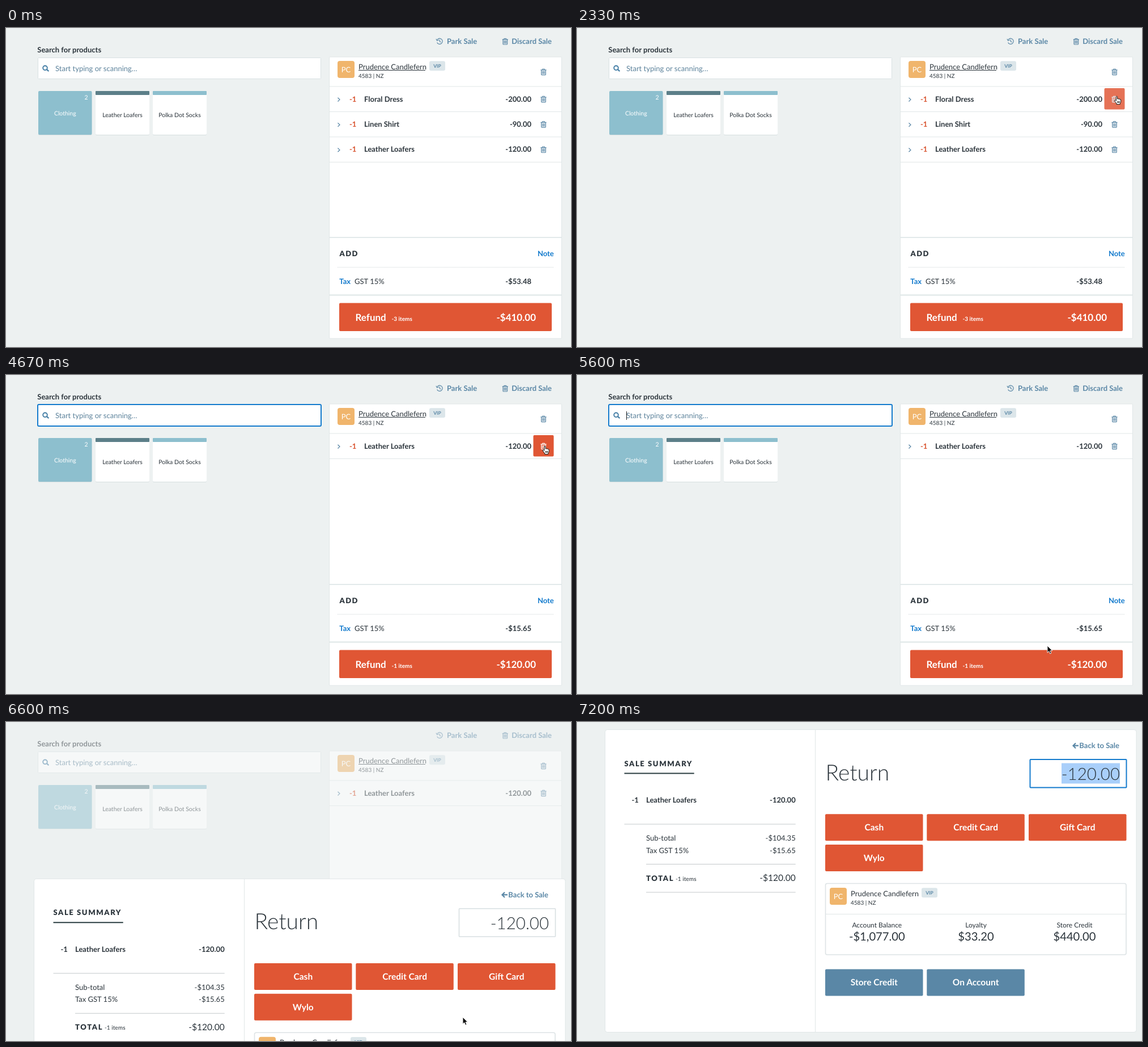
An HTML page for the animation above (8 s loop, 997x562 px).

```html
<!DOCTYPE html>
<html lang="en">
<head>
<meta charset="utf-8">
<title>Return sale</title>
<style>
html, body { margin: 0; width: 100%; height: 100%; overflow: hidden; background: #edf1f1; }
svg { display: block; width: 997px; height: 562px; font-family: Lato, sans-serif; text-rendering: geometricPrecision; }
</style>
</head>
<body>
<svg id="stage" viewBox="0 0 997 562" xmlns="http://www.w3.org/2000/svg"></svg>
<script>
const LOOP = 8000;
const INK = '#2b343b', BLUE = '#5a87a6', LINK = '#147bcd', RED = '#e05634', LINE = '#e0e6e7';
const CUSTOMER = 'Prudence Candlefern', INITIALS = 'PC', TERMINAL = 'Wylo';
const ITEMS = [['Floral Dress', 200], ['Linen Shirt', 90], ['Leather Loafers', 120]];
const CLICKS = [2870, 4130], PAY = 6430, SLIDE = 490, ROW = 44.4;

// markup helpers
const text = (x, y, s, o = {}) =>
  `<text x="${x}" y="${y}" font-size="${o.size || 13}" font-weight="${o.w || 400}" fill="${o.fill || INK}"` +
  ` text-anchor="${o.at || 'start'}"${o.ls ? ` letter-spacing="${o.ls}"` : ''}${o.id ? ` id="${o.id}"` : ''}>${s}</text>`;
const bold = (x, y, s, o = {}) => text(x, y, s, { w: 700, ...o });
const box = (x, y, w, h, fill, r = 0, more = '') =>
  `<rect x="${x}" y="${y}" width="${w}" height="${h}" rx="${r}" fill="${fill}" ${more}/>`;
const rule = (x1, x2, y, color = LINE, w = 1, more = '') =>
  `<path d="M${x1} ${y}H${x2}" stroke="${color}" stroke-width="${w}" ${more}/>`;
const group = (id, body, more = '') => `<g id="${id}" ${more}>${body}</g>`;

const trash = (x, y, color = BLUE) =>
  `<g transform="translate(${x} ${y})" fill="none" stroke="${color}">` +
  `<path d="M-5 -3.5H5" stroke-width="1.4"/><path d="M-2 -4V-5.3H2V-4"/>` +
  `<path d="M-3.8 -3V4.2Q-3.8 5.2 -2.8 5.2H2.8Q3.8 5.2 3.8 4.2V-3" stroke-width="1.2"/>` +
  `<path d="M-1.8 -1.7V3.6M0 -1.7V3.6M1.8 -1.7V3.6" stroke-width="1.1"/></g>`;

const customer = (x, y, line) =>
  box(x, y, 30, 30, '#f0b56c', 4) +
  text(x + 15, y + 19.7, INITIALS, { fill: '#fff', at: 'middle' }) +
  text(x + 37, y + 14.6, CUSTOMER, line ? { id: 'buyer' } : {}) +
  (line ? rule(x + 37, x + 155, y + 16.5, INK) : '') +
  text(x + 37, y + 29.8, '4583 | NZ', { size: 10 }) +
  box(x + 162, y + 0.2, 28, 17, '#dce6ea', 3) +
  bold(x + 176, y + 11.8, 'VIP', { size: 8.5, fill: BLUE, at: 'middle' });

const tile = (x, label, top) =>
  box(x, 112, 95, 77, '#d6dfe0', 2) + box(x, 111, 95, 77, '#fff', 2) +
  box(x, 111, 95, 7, top, 1) +
  text(x + 47.5, 157, label, { size: 10.5, at: 'middle' });

const payButton = (x, y, label, fill) =>
  box(x, y, 172.5, 47, fill, 2) +
  bold(x + 86.3, y + 28.8, label, { size: 15.5, fill: '#fff', at: 'middle' });

const itemRow = ([name, price], i) => group('row' + i,
  `<path d="M585.5 122.7l3.4 3.4l-3.4 3.4" fill="none" stroke="${BLUE}" stroke-width="1.3"/>` +
  bold(606, 129.7, '-1', { fill: '#d9532f' }) + bold(632, 129.7, name) +
  bold(927, 129.7, `-${price}.00`, { at: 'end' }) +
  trash(948.5, 125.5) + rule(571, 980, 147.5));

const balance = (x, label, amount) =>
  text(x, 361.8, label, { size: 12, at: 'middle' }) +
  text(x, 385, amount, { size: 20.2, at: 'middle' });

const register =
  // header links
  `<path d="M760.6 25.5A5 5 0 1 0 761 20.6M759 19.2L760.6 22.3L763.8 21.3M765.3 20.5V23.8L767.5 25" fill="none" stroke="${BLUE}" stroke-width="1.2"/>` +
  bold(778, 28.2, 'Park Sale', { fill: BLUE }) +
  trash(880.8, 23.8) + bold(892.3, 28.2, 'Discard Sale', { fill: BLUE }) +
  // search
  bold(55.3, 43.3, 'Search for products') +
  box(56.5, 52.5, 499, 37, '#fff', 1, `stroke="#d9e1e3"`) +
  box(56, 52, 500, 38, 'none', 2, `id="focus" stroke="${LINK}" stroke-width="2"`) +
  `<path d="M72 73L75.3 76.3" stroke="#417ca4" stroke-width="2.2"/><circle cx="69" cy="70.3" r="3.8" fill="none" stroke="#417ca4" stroke-width="1.9"/>` +
  text(87, 76, 'Start typing or scanning…', { fill: '#5c829b' }) +
  box(87, 64, 1, 15, '#222', 0, 'id="caret"') +
  // tiles
  box(57, 112, 94.5, 77, '#d6dfe0', 2) + box(57, 111, 94.5, 77, '#8dbfce', 2) +
  text(104.3, 153.8, 'Clothing', { size: 10.5, fill: '#fff', at: 'middle' }) +
  text(144.5, 125.5, '2', { size: 10.5, fill: '#fff', at: 'end' }) +
  tile(158, 'Leather Loafers', '#5c7f89') + tile(259, 'Polka Dot Socks', '#8dbfce') +
  // sale panel
  box(570.5, 51, 410, 496, '#fff', 1, `stroke="${LINE}"`) +
  customer(585, 58, true) + trash(948.5, 77.5) + rule(571, 980, 103) +
  ITEMS.map(itemRow).join('') +
  group('hot', box(930.5, 106, 36, 37.5, RED, 2) + trash(948.5, 125.5, '#fff')) +
  rule(571, 980, 369, '#d9e2e3', 1.6) +
  text(588.6, 402.3, 'ADD', { w: 900, ls: 1.4 }) +
  bold(966.8, 402.3, 'Note', { fill: LINK, at: 'end' }) +
  rule(585, 966, 421.5, '#cfd6d8', 1, 'stroke-dasharray="1 1"') +
  bold(588.3, 451.2, 'Tax', { fill: LINK }) + text(615, 451.2, 'GST 15%') +
  bold(927, 451.2, '', { at: 'end', id: 'tax' }) +
  rule(571, 980, 470.5, '#d3dfdf', 1.6) +
  box(588, 484.5, 375, 49.5, RED, 2) +
  bold(616.5, 516, 'Refund', { size: 17, fill: '#fff' }) +
  bold(680.5, 516, '', { size: 10, fill: '#fff', id: 'count' }) +
  bold(935, 516, '', { size: 17, fill: '#fff', at: 'end', id: 'total' });

const payment =
  box(49.5, 13.5, 937.5, 533, '#fff', 4, `stroke="${LINE}"`) +
  `<path d="M420.5 14V546" stroke="${LINE}"/>` +
  // summary
  text(83.5, 77.6, 'SALE SUMMARY', { w: 900, ls: 1.6 }) +
  rule(83.5, 206.7, 90.5, '#2a3d40', 2) +
  bold(96.5, 141.8, '-1') + bold(122, 141.8, 'Leather Loafers') +
  bold(385.7, 141.8, '-120.00', { at: 'end' }) +
  rule(83.5, 385.7, 180, '#c3c9cb') +
  text(122, 209.2, 'Sub-total') + text(385.7, 209.2, '-$104.35', { at: 'end' }) +
  text(122, 230.5, 'Tax GST 15%') + text(385.7, 230.5, '-$15.65', { at: 'end' }) +
  rule(122, 385.7, 250.5, '#c3c9cb') +
  text(122, 279.7, 'TOTAL', { w: 900, ls: 1.6 }) + text(174, 279.7, '-1 items', { size: 10.2 }) +
  text(385.7, 280, '-$120.00', { size: 15.5, at: 'end' }) +
  rule(122, 385.7, 300, '#c3c9cb') +
  // amount
  `<path d="M885 41.7H876M880 37.2L875.5 41.7L880 46.2" fill="none" stroke="${BLUE}" stroke-width="2.2"/>` +
  bold(957, 46.3, 'Back to Sale', { fill: BLUE, at: 'end' }) +
  text(438.5, 102.6, 'Return', { size: 39, w: 300 }) +
  box(799.5, 66, 170, 49.5, '#fff', 1, 'id="amount"') +
  box(855, 72.5, 103, 36, '#a9cffa', 0, 'id="picked"') +
  text(958, 102, '-120.00', { size: 29.5, w: 300, at: 'end' }) +
  // payment types
  [['Cash', 438, 162.3], ['Credit Card', 617.3, 162.3], ['Gift Card', 797, 162.3], [TERMINAL, 438, 216]]
    .map(([s, x, y]) => payButton(x, y, s, RED)).join('') +
  // customer account
  box(438.5, 284.5, 530.5, 125.5, '#fff', 3, 'stroke="#dde3e5" stroke-width="1.6"') +
  customer(446, 292, false) + rule(439, 969, 338.5) +
  balance(529.3, 'Account Balance', '-$1,077.00') +
  balance(704, 'Loyalty', '$33.20') + balance(878, 'Store Credit', '$440.00') +
  payButton(438, 435.6, 'Store Credit', BLUE) + payButton(617.3, 435.6, 'On Account', BLUE);

const pointers =
  `<path id="arrow" d="M0 0V12.2L2.8 9.6L4.7 14L6.9 13L5 8.8H8.8Z" fill="#111" stroke="#fff" stroke-width="0.9"/>` +
  `<path id="hand" d="M-1.1 1Q0 -0.6 1.1 1V5Q2.3 4 3.2 5.2Q4.6 4.4 5.3 5.7Q7.2 5.2 7.2 7.2V9.5Q7.2 11.4 5.8 12.8V14.4H-0.4V13Q-2 11.4 -3.4 9Q-4.6 7.2 -3.4 6.7Q-2.3 6.4 -1.1 8.2ZM1.2 9V12M3 9V12M4.8 9V12" fill="#fff" stroke="#111" stroke-width="1"/>`;

document.getElementById('stage').innerHTML =
  box(0, 0, 997, 562, '#edf1f1') + register +
  box(0, 0, 997, 562, '#edf1f1', 0, 'id="veil"') + group('modal', payment) + pointers;

const $ = id => document.getElementById(id);
const set = (id, attr, v) => $(id).setAttribute(attr, v);
const show = (id, on) => set(id, 'visibility', on ? 'visible' : 'hidden');
const ramp = (t, a, b) => Math.min(1, Math.max(0, (t - a) / (b - a)));
const smooth = u => u * u * (3 - 2 * u);

// pointer stops: time, x, y
const PATH = [
  [1960, 1002, 168], [2290, 952.5, 120], [3900, 952.5, 120], [4600, 951, 125],
  [4700, 951, 125], [5600, 830, 477], [6050, 806, 520], [6680, 806, 520], [7000, 800, 580]
];
function pointerAt(t) {
  const i = PATH.findIndex(p => p[0] > t);
  if (i < 1) return null;
  const [t0, x0, y0] = PATH[i - 1], [t1, x1, y1] = PATH[i];
  const u = smooth(ramp(t, t0, t1));
  return [x0 + (x1 - x0) * u, y0 + (y1 - y0) * u];
}

function draw(t) {
  const gone = CLICKS.filter(c => t >= c).length;
  const last = CLICKS[gone - 1];

  // basket and totals
  ITEMS.forEach((_, i) => {
    show('row' + i, i >= gone);
    set('row' + i, 'transform', `translate(0 ${(i - gone) * ROW})`);
  });
  const sum = ITEMS.slice(gone).reduce((s, item) => s + item[1], 0);
  $('tax').textContent = '-$' + (sum * 3 / 23).toFixed(2);
  $('count').textContent = `-${ITEMS.length - gone} items`;
  $('total').textContent = `-$${sum}.00`;

  // hover and search focus
  const enter = gone ? ramp(t, last, last + 250) : ramp(t, 2190, 2360);
  set('hot', 'opacity', enter * (1 - ramp(t, 4880, 5050)));
  const focused = gone > 0 && t < PAY;
  set('focus', 'opacity', focused ? ramp(t, CLICKS[0] - 60, CLICKS[0] + 140) : 0);
  show('caret', focused && (t - last) % 1000 < 500);

  // payment sheet
  const u = ramp(t, PAY + 20, PAY + 20 + SLIDE);
  const p = 1 - (1 - u) * (1 - u);
  set('veil', 'opacity', p);
  set('modal', 'transform', `translate(0 ${549 * (1 - p)})`);
  show('modal', p > 0);
  const ready = t >= 6950;
  show('picked', ready);
  set('amount', 'stroke', ready ? LINK : '#d8dfe2');
  set('amount', 'stroke-width', ready ? 2 : 1.6);

  const at = pointerAt(t);
  const onTrash = at && at[0] > 930 && at[0] < 967 && at[1] > 105 && at[1] < 144;
  const onRefund = at && at[1] > 484 && t < 6530;
  const hand = onTrash || onRefund;
  show('hand', at && hand);
  show('arrow', at && !hand);
  if (at) set(hand ? 'hand' : 'arrow', 'transform', `translate(${at[0]} ${at[1]})`);
}

const start = performance.now();
function tick() {
  draw((performance.now() - start) % LOOP);
  requestAnimationFrame(tick);
}
tick();
</script>
</body>
</html>
```
